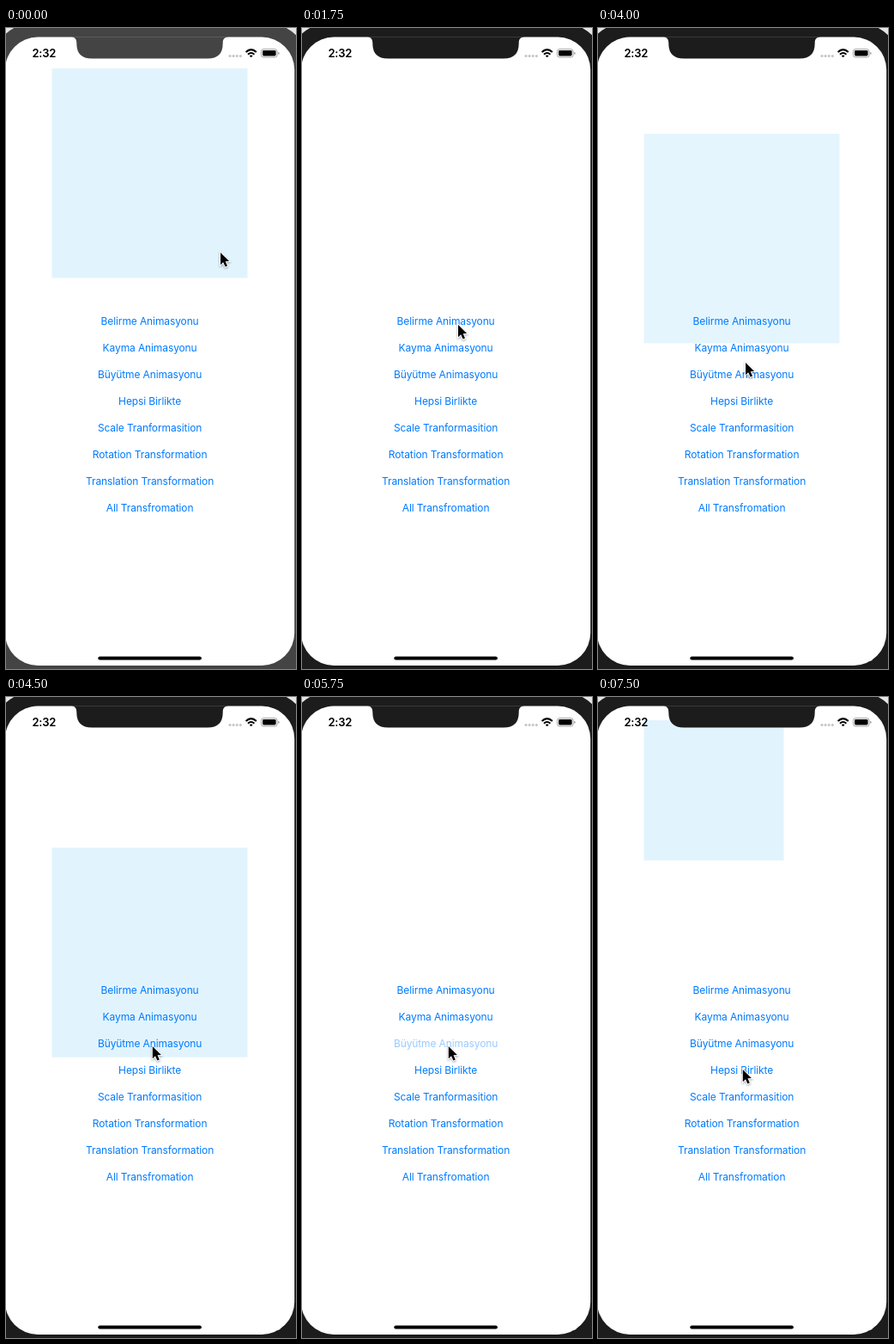
Animation of 338 by 745 pixels, one loop 8000 ms. Source, as an HTML page:

```html
<!DOCTYPE html>
<html lang="tr">
<head>
<meta charset="utf-8">
<title>Animasyonlar</title>
<style>
html, body { margin: 0; width: 100%; height: 100%; overflow: hidden; background: #e6e6e6; }
svg { display: block; width: 338px; height: 745px; }
text { font-family: Inter, Roboto, "Liberation Sans", sans-serif; }
#menu text { font-size: 12px; letter-spacing: -0.11px; fill: #007aff; text-anchor: middle; }
#clock { font-size: 13px; font-weight: 600; letter-spacing: -0.2px; }
#cursor { filter: drop-shadow(0 1px 1px rgba(0, 0, 0, 0.35)); }
</style>
</head>
<body>
<svg viewBox="0 0 338 745">
  <rect id="body" x="-17" y="-6" width="370" height="790" rx="50"/>
  <rect x="-1" y="10.6" width="337.2" height="730.4" rx="38" fill="#fff"/>
  <rect id="box" fill="#e1f4fe"/>
  <g id="menu"></g>
  <path id="notch" d="M76 10.2 Q82.3 10.6 82.3 17 V18 Q82.3 35.5 100 35.5 H235 Q252.7 35.5 252.7 18 V17 Q252.7 10.6 259 10.2 Z"/>
  <text id="clock" x="30.4" y="34">2:32</text>
  <g fill="#c4c4c6">
    <circle cx="261" cy="32.6" r="1.5"/><circle cx="265.1" cy="32.6" r="1.5"/>
    <circle cx="269.2" cy="32.6" r="1.5"/><circle cx="273.3" cy="32.6" r="1.5"/>
  </g>
  <g fill="none" stroke="#000" stroke-width="2.1">
    <path d="M279.6 28 Q285.7 22.2 291.8 28"/>
    <path d="M282 30.7 Q285.7 27.3 289.4 30.7"/>
  </g>
  <path d="M283.8 32.2 Q285.7 30.7 287.6 32.2 L285.7 34.2 Z"/>
  <rect x="297.5" y="24.6" width="18.6" height="9.4" rx="2.6" fill="none" stroke="#a2a2a2"/>
  <rect x="299" y="26.1" width="15.6" height="6.4" rx="1.4"/>
  <path d="M317.2 27.7 Q318.7 28.2 318.7 29.3 Q318.7 30.4 317.2 30.9 Z" fill="#a2a2a2"/>
  <rect x="107.3" y="730.4" width="120.6" height="4" rx="2"/>
  <path id="cursor" d="M0 0 V14.2 L3.2 11.2 L5.6 16.6 L8 15.5 L5.7 10.2 L10.1 10 Z"
    stroke="#fff" stroke-width="2" paint-order="stroke"/>
</svg>
<script>
const LOOP = 8000, STEP = 250;
const $ = id => document.getElementById(id);

const labels = ["Belirme Animasyonu", "Kayma Animasyonu", "Büyütme Animasyonu", "Hepsi Birlikte",
  "Scale Tranformasition", "Rotation Transformation", "Translation Transformation", "All Transfromation"];
const items = labels.map((label, i) => {
  const el = document.createElementNS("http://www.w3.org/2000/svg", "text");
  el.setAttribute("x", 167.6);
  el.setAttribute("y", 344.8 + 31 * i);
  el.textContent = label;
  return $("menu").appendChild(el);
});

// [start, x, y]
const pointer = [[0, 250, 261], [250, 216, 303], [500, 182, 345], [2000, 172, 366],
  [2250, 172.8, 374], [4000, 172, 389], [4250, 170.8, 406], [6250, 168.8, 433]];

// [start, item, opacity]
const presses = [[0, -1, 1], [1250, 0, 0.3], [1750, -1, 1], [2750, 1, 0.3],
  [3500, 1, 0.75], [3750, -1, 1], [5750, 2, 0.4], [6000, -1, 1]];

const at = (table, t) => table.filter(row => row[0] <= t).pop();
const clamp = v => Math.min(1, Math.max(0, v));

// Cubic ease-in-out with handles at .42 and .58
function ease(x) {
  x = clamp(x);
  let lo = 0, hi = 1;
  for (let i = 0; i < 24; i++) {
    const s = (lo + hi) / 2, r = 1 - s;
    if (1.26 * r * r * s + 1.74 * r * s * s + s ** 3 < x) lo = s; else hi = s;
  }
  return lo * lo * (3 - 2 * lo);
}

function boxAt(t) {
  const box = { x: 53.5, y: 47, width: 228, height: 243.5, opacity: 1 };
  if (t >= 1500 && t < 2000) box.opacity = 0;
  if (t >= 2750 && t < 3500) {
    box.opacity = 0;
  } else if (t >= 3500 && t < 5750) {
    box.y = 47 + 163 * ease((t - 2800) / 2500);
    box.opacity = 0.7 + 0.3 * clamp((t - 3500) / 750);
  } else if (t >= 5750) {
    box.y = 27;
    box.width = box.height = 163 * ease((t - 5750) / 1235);
  }
  return box;
}

function draw(now) {
  const t = Math.floor(now % LOOP / STEP) * STEP;
  const bezel = t < 1000 ? "#444" : "#1c1c1c";
  $("body").setAttribute("fill", bezel);
  $("notch").setAttribute("fill", bezel);
  for (const [key, value] of Object.entries(boxAt(t))) $("box").setAttribute(key, value);
  const [, x, y] = at(pointer, t);
  $("cursor").setAttribute("transform", `translate(${x} ${y})`);
  const [, pressed, opacity] = at(presses, t);
  items.forEach((el, i) => el.setAttribute("opacity", i === pressed ? opacity : 1));
}

let start;
function tick(now) {
  start ??= now;
  draw(now - start);
  requestAnimationFrame(tick);
}
draw(0);
requestAnimationFrame(tick);
</script>
</body>
</html>
```
